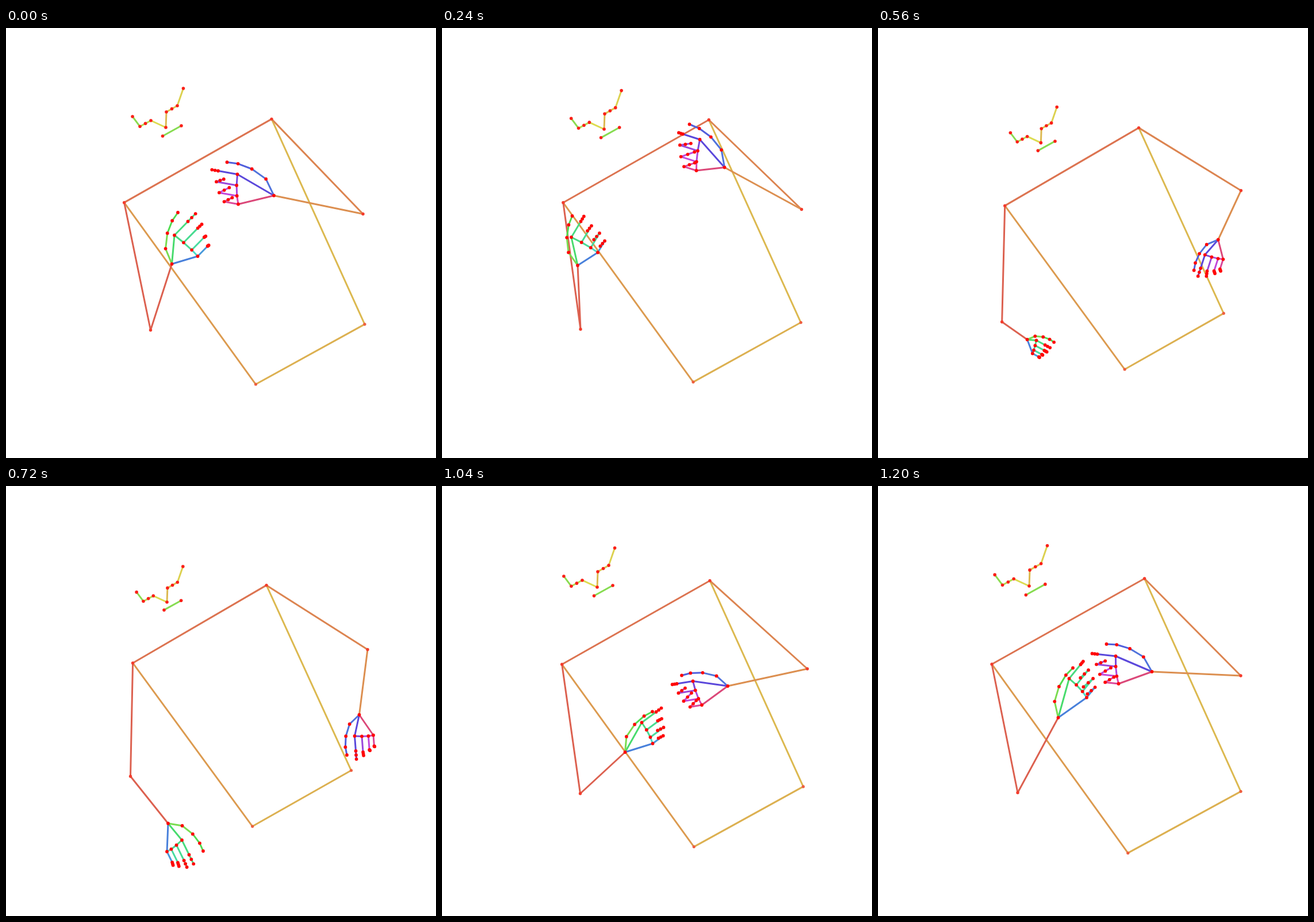
These frames come from a looping animation (748 px wide and 748 px high, 1.28 s). An HTML page with a canvas:

```html
<!DOCTYPE html>
<html lang="en">
<head>
<meta charset="utf-8">
<title>Pose skeleton</title>
<style>
html, body { margin: 0; width: 100%; height: 100%; overflow: hidden; background: #fff; }
canvas { display: block; }
</style>
</head>
<body>
<canvas id="stage" width="748" height="748"></canvas>
<script>
const STEP = 80, STEPS = 16;
const KEYS = [0, 3, 5, 9, 11, 13, 15]; // steps at which each path has a key point
const ctx = document.getElementById('stage').getContext('2d');

// Middle of the shoulders and the distance between them.
const trunk = [[333.8, 231, 294.7], [337.5, 231.8, 291.4], [337.8, 239.3, 278.5], [336.8, 240.3, 269],
  [338, 238.3, 282], [337.3, 237.5, 295.6], [330.8, 235.5, 304.5]];
const nosePath = [[278, 173], [282, 176], [284.5, 190], [280, 202], [276, 194], [270, 176], [263, 174]];

// Elbow and wrist on the stage; thumb tip and outer knuckles from the wrist;
// bone is the first finger segment with the curl of the rest (negative folds back).
const armA = {
  side: -1, fold: 0.17,
  elbow: [[251.5, 525.5], [241, 524], [223, 523], [216.5, 505], [223, 520.5], [240.5, 535], [243, 533.5]],
  wrist: [[288.5, 410.5], [236, 413], [244, 467], [282, 587], [310.5, 551], [318.5, 463], [313.5, 403]],
  thumb: [[10.5, -89.5], [-9.5, -86], [25.5, -62.5], [61, 48], [76.5, 0.5], [47.5, -70.5], [25.5, -86.5]],
  index: [[4.5, -50], [-11, -49], [7, -39], [24, 29], [39.5, 0.5], [29, -51.5], [19, -68]],
  pinky: [[45, -13.5], [35, -22.5], [31.5, -10.5], [-2, 49], [27.5, 31], [48, -15], [49.5, -35]],
  bone: [[23.5, -24, 0.1], [16.5, -27.5, -0.5], [21, -18.5, -0.2], [12.5, 25.5, 0.25],
    [26.5, 7, 0.05], [25, -18.5, -0.4], [20, -24.5, -0.75]],
  thumbHues: [102, 120], fingerHues: [143, 150, 156, 207], palmHues: [135, 143, 152, 172, 217]
};
const armB = {
  side: 1, fold: -0.75,
  elbow: [[621, 323.5], [625.5, 315.5], [634, 293], [629, 284.5], [638, 298], [635.5, 318], [631, 330]],
  wrist: [[466, 291.5], [491.5, 242.5], [537, 312.5], [614.5, 398], [564, 390], [497, 348], [476.5, 323]],
  thumb: [[-81.5, -58], [-61, -75], [-71.5, 4.5], [-21.5, 70], [-58.5, 53.5], [-80, -18.5], [-79, -48]],
  index: [[-63.5, -37], [-43, -48.5], [-46.5, -3], [-8, 37], [-37, 26.5], [-60.5, -8.5], [-63, -27]],
  pinky: [[-62, 15], [-49, 5.5], [-24, 26.5], [24.5, 35.5], [-1, 38], [-45, 33], [-58, 21]],
  bone: [[-33.5, -6, -0.5], [-29.5, -9.5, -0.7], [-24, 13, 0], [2, 26, 0.05],
    [-13, 25, -0.07], [-28, 4.5, -0.6], [-32, -3.5, -0.6]],
  thumbHues: [225, 234], fingerHues: [247, 273, 290, 326], palmHues: [248, 260, 282, 318, 340]
};

// Smooth curve through the key points, uneven spacing allowed.
function slope(path, k, j) {
  const rate = i => (path[i + 1][j] - path[i][j]) / (KEYS[i + 1] - KEYS[i]);
  if (k === 0) return rate(0);
  if (k === KEYS.length - 1) return rate(k - 1);
  const a = KEYS[k] - KEYS[k - 1], b = KEYS[k + 1] - KEYS[k];
  return (b * rate(k - 1) + a * rate(k)) / (a + b);
}

function at(path, step) {
  let k = 0;
  while (k < KEYS.length - 2 && step >= KEYS[k + 1]) k++;
  const h = KEYS[k + 1] - KEYS[k], s = (step - KEYS[k]) / h;
  const ease = s * s * (3 - 2 * s), lead = s * (1 - s) * (1 - s), tail = s * s * (s - 1);
  return path[k].map((p, j) => p + (path[k + 1][j] - p) * ease +
    h * (slope(path, k, j) * lead + slope(path, k + 1, j) * tail));
}

const tone = (hue, light = 59) => `hsl(${hue} 67% ${light}%)`;
const mix = (a, b, t) => [a[0] + (b[0] - a[0]) * t, a[1] + (b[1] - a[1]) * t];
// Moves p by u along v and w across it.
const shift = (p, v, u, w = 0) => [p[0] + v[0] * u - v[1] * w, p[1] + v[1] * u + v[0] * w];

function line(color, ...pts) {
  ctx.strokeStyle = color;
  ctx.beginPath();
  pts.forEach(p => ctx.lineTo(...p));
  ctx.stroke();
}

function dots(color, r, pts) {
  ctx.fillStyle = color;
  for (const p of pts) {
    ctx.beginPath();
    ctx.arc(...p, r, 0, 7);
    ctx.fill();
  }
}

// The whole torso follows from the shoulder span.
function torso(step) {
  const [x, y, span] = at(trunk, step);
  const turn = (30.2 - (span - 269) * 0.026) * Math.PI / 180;
  const dx = span * Math.cos(turn), dy = span * Math.sin(turn);
  const hipA = [x + span * 0.3415, y + span * 1.44 - 35.6];
  return {
    span, hipA,
    hipB: [hipA[0] + dx * 0.739, hipA[1] - dy * 0.719],
    shA: [x - dx / 2, y + dy / 2],
    shB: [x + dx / 2, y - dy / 2]
  };
}

// Draws the face lines and returns its joints.
function face(step, span) {
  const nose = at(nosePath, step), k = span / 295;
  const spot = (x, y) => [nose[0] + x * k, nose[1] + y * k];
  const earA = spot(-58, -19), eyeA = spot(-45, -1.7), innA = spot(-26, -12);
  const earB = spot(30.5, -68), eyeB = spot(20, -37.8), innB = spot(1, -27);
  const lipA = spot(-5.5, 15), lipB = spot(27, -3);
  line(tone(95), earA, eyeA);
  line(tone(78), eyeA, innA);
  line(tone(60), innA, nose);
  line(tone(45), nose, innB);
  line(tone(50), innB, eyeB);
  line(tone(55), eyeB, earB);
  line(tone(97), lipA, lipB);
  return [nose, earA, eyeA, innA, earB, eyeB, innB, lipA, lipB, mix(eyeA, innA, 0.5), mix(innB, eyeB, 0.5)];
}

// Draws the hand lines and returns its joints.
function hand(arm, step) {
  const wrist = at(arm.wrist, step), tip = at(arm.thumb, step);
  const index = at(arm.index, step), pinky = at(arm.pinky, step);
  const [bx, by, curl] = at(arm.bone, step);

  const bow = 0.155 * arm.side;
  const thumb = [
    shift(wrist, tip, 0.28, bow), shift(wrist, tip, 0.58, bow),
    shift(wrist, tip, 0.83, bow * 0.58), shift(wrist, tip, 1)
  ];

  const finger = (along, bulge, size, reach, fold) => {
    const v = [bx * size, by * size];
    const base = shift(wrist, mix(index, pinky, along), bulge);
    const bend = shift(base, v, 1), end = shift(bend, v, reach, fold);
    return [base, bend, mix(bend, end, 0.5), end];
  };
  const fold = arm.fold * curl;
  const fingers = [
    finger(0, 1, 1, 0.52 + curl * 0.4, 0),
    finger(0.38, 1.03, 1.05, curl + 0.17, fold / 2),
    finger(0.72, 1.03, 0.92, curl, fold),
    finger(1, 1, 0.73, curl, fold)
  ];

  const bases = fingers.map(f => f[0]);
  const palm = [wrist, ...bases, wrist];
  arm.palmHues.forEach((hue, i) => line(tone(hue, 57), palm[i], palm[i + 1]));
  line(tone(arm.thumbHues[0]), wrist, thumb[0], thumb[1]);
  line(tone(arm.thumbHues[1]), thumb[1], thumb[2], thumb[3]);
  fingers.forEach((f, i) => line(tone(arm.fingerHues[i], 57), ...f));
  return [wrist, ...thumb, ...fingers.flat()];
}

function draw(step) {
  ctx.clearRect(0, 0, 748, 748);
  ctx.lineWidth = 3;
  ctx.lineCap = ctx.lineJoin = 'round';

  const { span, shA, shB, hipA, hipB } = torso(step);
  const elA = at(armA.elbow, step), elB = at(armB.elbow, step);

  line(tone(32), shA, hipA);
  line(tone(45), shB, hipB);
  line(tone(41), hipA, hipB);
  line(tone(15), shA, shB);
  line(tone(7), shA, elA, at(armA.wrist, step));
  line(tone(22), shB, elB);
  line(tone(27), elB, at(armB.wrist, step));

  const head = face(step, span);
  const hands = [...hand(armA, step), ...hand(armB, step)];

  dots('#ee5f40', 2.6, [hipA, hipB]);
  dots('#f43c2c', 2.7, [shA, elA, shB, elB]);
  dots('#fa2018', 2.8, head);
  dots('#ff0808', 2.9, hands);
}

function tick(now) {
  draw(Math.floor(now / STEP) % STEPS);
  requestAnimationFrame(tick);
}
draw(0);
requestAnimationFrame(tick);
</script>
</body>
</html>
```
